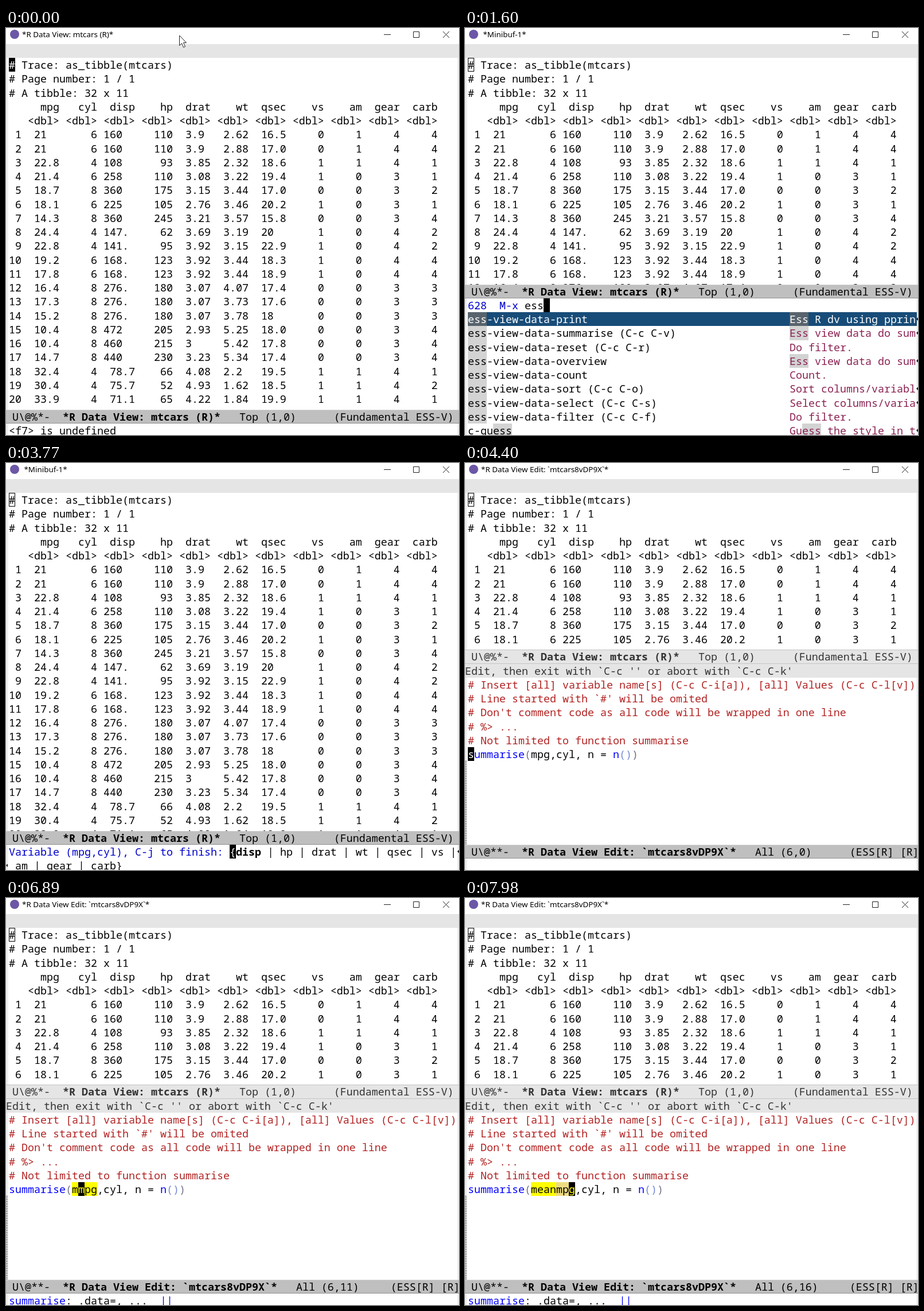
Animation, 790 px wide and 709 px high, one loop 8 s. Source, as an HTML page:

```html
<!DOCTYPE html>
<html lang="en">
<head>
<meta charset="utf-8">
<title>R data view</title>
<style>
html, body { margin: 0; width: 100%; height: 100%; overflow: hidden; background: #fff; }
#stage { position: relative; width: 790px; height: 709px; overflow: hidden; }
#stage, .pane { background: linear-gradient(90deg, #f0f0f0 4px, #fff 4px 787px, #f0f0f0 787px); }
#stage, pre { font: 18.33px/24.25px "Noto Sans Mono", monospace; color: #000; font-variant-ligatures: none; }
pre { position: absolute; left: 5px; top: 52px; margin: 0; }
#title { position: absolute; top: 0; width: 100%; height: 28px; background: #fff; }
#name { position: absolute; left: 28px; font: 13.4px/23px "Noto Sans", sans-serif; white-space: pre; }
#toolbar { position: absolute; top: 28px; width: 100%; height: 24px; background: #e5e5e5; }
svg { position: absolute; left: 0; top: 0; }
#hash { position: absolute; left: 5px; top: 52px; width: 11px; height: 24px; box-sizing: border-box; }
.hollow { border: 1px solid #000; }
.pane { position: absolute; width: 100%; bottom: 0; }
.row { position: absolute; height: 24.25px; white-space: pre; }
.mode, .idle, .head { width: 100%; overflow: hidden; background: #bfbfbf; box-shadow: inset 0 1px #cfcfcf, inset 0 -1px #909090; }
.idle, .head { background: #e5e5e5; color: #333; box-shadow: inset 0 1px #c4c4c4, inset 0 -1px #c4c4c4; }
.head { box-shadow: none; }
.prompt { color: mediumblue; }
.blue { color: blue; }
.note { color: firebrick; }
.outer { color: #707183; }
.inner { color: #7388d6; }
.hot { background: yellow; }
.region { background: #eedc82; }
.cursor { background: black; color: white; }
.cursor.hot { color: yellow; }
.row i { font-style: normal; display: inline-block; height: 100%; vertical-align: top; }
.hit { background: lightgray; }
.doc { position: absolute; left: 561px; color: #8b2252; }
.chosen { background: #184c78; width: 783px; }
.chosen, .chosen .doc { color: white; }
.chosen .hit { background: #58636d; }
.arrow { position: absolute; width: 3px; height: 6px; margin-top: 9px; background: #222; clip-path: polygon(0 50%, 100% 0, 100% 100%); }
.empty { position: absolute; top: 519px; width: 3px; height: 146px; background: repeating-linear-gradient(#555 0 1px, #eee 1px 3px); }
</style>
</head>
<body>
<div id="stage">
<pre id="table"></pre>
<div id="hash"></div>
<div id="lower"></div>
<div id="title"><span id="name"></span></div>
<div id="toolbar"></div>
<svg width="790" height="52" fill="none" stroke="#222">
  <circle cx="15" cy="11" r="8" fill="#6b57a6" stroke="none"/>
  <path d="M659 11.5h12M710.5 6.5h10v10h-10zM762 6l11 11m0-11l-11 11"/>
  <path id="pointer" fill="#fff" d="M302.5 13v17.5l4-3.8 3 7 3-1.3-3-6.8h5z"/>
</svg>
</div>
<script>
const $ = id => document.getElementById(id);
const PITCH = 24.25, WRAP = 71;

// "=" repeats the value above it.
const column = text => text.split(' ').reduce((list, v) => [...list, v === '=' ? list.at(-1) : v], []);
const TABLE = {
  mpg: column('21 = 22.8 21.4 18.7 18.1 14.3 24.4 22.8 19.2 17.8 16.4 17.3 15.2 10.4 = 14.7 32.4 30.4 33.9'),
  cyl: [...'66468684466', ...'8'.repeat(6), ...'444'],
  disp: column('160 = 108 258 360 225 360 147. 141. 168. = 276. = = 472 460 440 78.7 75.7 71.1'),
  hp: column('110 = 93 110 175 105 245 62 95 123 = 180 = = 205 215 230 66 52 65'),
  drat: column('3.9 = 3.85 3.08 3.15 2.76 3.21 3.69 3.92 = = 3.07 = = 2.93 3 3.23 4.08 4.93 4.22'),
  wt: column('2.62 2.88 2.32 3.22 3.44 3.46 3.57 3.19 3.15 3.44 = 4.07 3.73 3.78 5.25 5.42 5.34 2.2 1.62 1.84'),
  qsec: column('16.5 17.0 18.6 19.4 17.0 20.2 15.8 20 22.9 18.3 18.9 17.4 17.6 18 18.0 17.8 17.4 19.5 18.5 19.9'),
  vs: [...'00110101111', ...'0'.repeat(6), ...'111'],
  am: [...'111', ...'0'.repeat(14), ...'111'],
  gear: [...'44433334444', ...'3'.repeat(6), ...'444'],
  carb: [...'44112142244333444121']
};
const VARIABLES = Object.keys(TABLE);

// Lines up the decimal points, then sets the column flush right.
function alignColumn(values) {
  const whole = v => v.split('.')[0].length;
  const widest = Math.max(...values.map(whole));
  const shifted = values.map(v => ' '.repeat(widest - whole(v)) + v);
  const width = Math.max(...shifted.map(v => v.length));
  return shifted.map(v => v.padEnd(width));
}

function tableText() {
  const line = (label, cells) => `${label}`.padStart(2) + cells.map(c => ' ' + c.padStart(5)).join('');
  const columns = Object.values(TABLE).map(alignColumn);
  return [
    '# Trace: as_tibble(mtcars)', '# Page number: 1 / 1', '# A tibble: 32 x 11',
    line('', VARIABLES), line('', VARIABLES.map(() => '<dbl>')),
    ...columns[0].map((_, i) => line(i + 1, columns.map(c => c[i])))
  ].join('\n');
}
$('table').textContent = tableText();

// Rows are counted upwards from the echo area.
const rowTop = k => 689 - PITCH * k;
const row = (k, html, cls = '', x = 5) =>
  `<div class="row ${cls}" style="top:${rowTop(k)}px;left:${x}px">${html}</div>`;
const pane = k => `<div class="pane" style="top:${rowTop(k)}px"></div>`;
const arrow = (k, x) => `<div class="arrow" style="top:${rowTop(k)}px;left:${x}px"></div>`;
const span = (cls, text) => `<i class="${cls}">${text}</i>`;
const bar = (k, flags, buffer, where, modes, cls = 'mode') =>
  row(k, ` U\\@${flags}-  <b>${buffer}</b>   ${where.padEnd(15)}${modes}`, cls, 0);

const VIEW = '*R Data View: mtcars (R)*';
const EDIT = '*R Data View Edit: `mtcars8vDP9X`*';
const MINI = ' *Minibuf-1*';
const viewBar = (k, cls) => bar(k, '%*', VIEW, 'Top (1,0)', '(Fundamental ESS-V)', cls);

const idle = () => ({
  name: VIEW, active: true, pointer: true,
  html: pane(1) + viewBar(1) + row(0, '&lt;f7> is undefined')
});

const COMMANDS = [
  ['ess-view-data-print', 'Ess R dv using pprin'],
  ['ess-view-data-summarise (C-c C-v)', 'Ess view data do sum'],
  ['ess-view-data-reset (C-c C-r)', 'Do filter.'],
  ['ess-view-data-overview', 'Ess view data do sum'],
  ['ess-view-data-count', 'Count.'],
  ['ess-view-data-sort (C-c C-o)', 'Sort columns/variabl'],
  ['ess-view-data-select (C-c C-s)', 'Select columns/varia'],
  ['ess-view-data-filter (C-c C-f)', 'Do filter.'],
  ['c-guess', 'Guess the style in t']
];

function highlight(text, input) {
  const i = text.toLowerCase().indexOf(input), end = i + input.length;
  if (!input || i < 0) return text;
  return text.slice(0, i) + span('hit', text.slice(i, end)) + text.slice(end);
}

function command(input, count, chosen = 0) {
  const list = COMMANDS.map(([name, doc], i) =>
    row(8 - i, highlight(name, input) + `<span class="doc">${highlight(doc, input)}</span>`,
      i === chosen ? 'chosen' : '') + (doc.length === 20 ? arrow(8 - i, 787) : ''));
  const prompt = span('prompt', `${count}`.padEnd(5) + 'M-x ');
  return {
    name: MINI, pointer: !input,
    html: pane(10) + viewBar(10) + row(9, prompt + input + span('cursor', ' ')) + list.join('')
  };
}

function pick(n) {
  const prompt = `Variable (${VARIABLES.slice(0, n)}), C-j to finish: `;
  const text = `${prompt}{${VARIABLES.slice(n).join(' | ')}}`;
  const first = VARIABLES[n], rest = prompt.length + 1 + first.length;
  return {
    name: MINI,
    html: pane(2) + viewBar(2) +
      row(1, span('prompt', prompt) + span('cursor', '{') + `<b>${first}</b>` + text.slice(rest, WRAP)) +
      row(0, text.slice(WRAP)) + arrow(1, 787) + arrow(0, 0)
  };
}

const NOTES = [
  '# Insert [all] variable name[s] (C-c C-i[a]), [all] Values (C-c C-l[v])',
  "# Line started with `#' will be omited",
  "# Don't comment code as all code will be wrapped in one line",
  '# %> ...',
  '# Not limited to function summarise'
];

function edit(typed, col, { hot = false, echo = hot, region = col } = {}) {
  const word = typed + 'mpg', wordEnd = 10 + word.length;
  const tokens = [['summarise', 'blue'], ['(', 'outer'], [word, hot ? 'hot' : ''],
    [',cyl, n = ', ''], ['n', 'blue'], ['()', 'inner'], [')', 'outer']];
  const chars = tokens.flatMap(([text, cls]) => [...text].map(c => [c, cls]));
  const code = chars.map(([c, cls], i) => {
    if (i === col) return span(`cursor ${hot && i < wordEnd ? 'hot' : ''}`, c);
    return span(i >= region && i < col ? 'region' : cls, c === ' ' ? '&nbsp;' : c);
  });
  return {
    name: EDIT,
    html: pane(15) + viewBar(15, 'idle') +
      row(14, "Edit, then exit with `C-c '' or abort with `C-c C-k'", 'head', 0) +
      NOTES.map((text, i) => row(13 - i, text, 'note')).join('') +
      row(8, code.join('')) + '<div class="empty"></div>' +
      bar(1, '**', EDIT, `All (6,${col})`, '(ESS[R] [R]') +
      (echo ? row(0, span('blue', 'summarise') + ': .data=, ...  ' + span('blue', '||')) : '')
  };
}

const hot = { hot: true }, quiet = { hot: true, echo: false };
const scenes = [
  [0, idle()],
  [680, command('', 7912)],
  [1140, command('e', 5388)],
  [1450, command('es', 1604)],
  [1600, command('ess', 628)],
  [2150, command('ess', 628, 1)],
  [2540, pick(0)],
  [3400, pick(1)],
  [3770, pick(2)],
  [4400, edit('', 0)],
  [5410, edit('', 23)],
  [5570, edit('', 19)],
  [5880, edit('', 14)],
  [6210, edit('', 10)],
  [6690, edit('', 10, hot)],
  [6890, edit('m', 11, hot)],
  [6970, edit('me', 12, hot)],
  [7050, edit('mea', 13, hot)],
  [7220, edit('mean', 14, hot)],
  [7590, edit('mean', 14, quiet)],
  [7760, edit('mean', 14, hot)],
  [7820, edit('mean', 14, quiet)],
  [7980, edit('mean', 16, { hot: true, region: 14 })]
];

let shown;
function draw() {
  const t = performance.now() % 8000;
  const scene = scenes.findLast(([start]) => start <= t)[1];
  if (scene !== shown) {
    shown = scene;
    $('name').textContent = scene.name;
    $('lower').innerHTML = scene.html;
    $('hash').className = scene.active ? 'cursor' : 'hollow';
    $('hash').textContent = scene.active ? '#' : '';
    $('pointer').style.display = scene.pointer ? '' : 'none';
  }
  requestAnimationFrame(draw);
}
draw();
</script>
</body>
</html>
```
